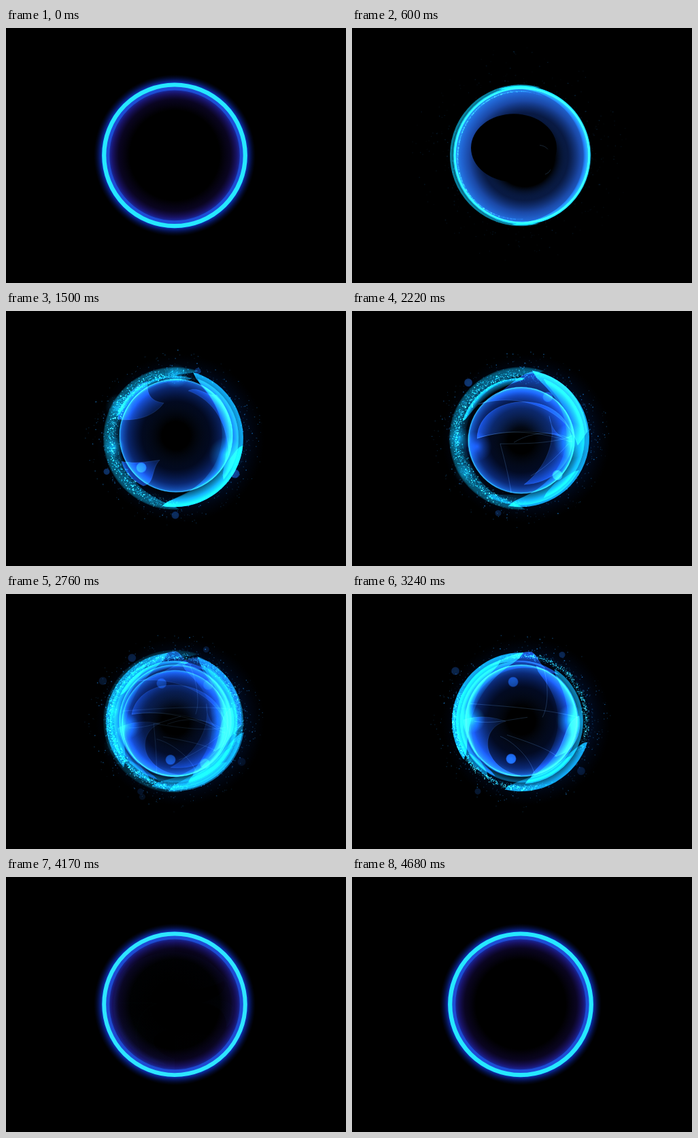
Recreate the animation shown at these times as an HTML page with a canvas. Size 500 px wide and 375 px high, loop 4.71 s.

```html
<!DOCTYPE html>
<html lang="en">
<head>
<meta charset="utf-8">
<title>Neon orb</title>
<style>
  html, body { margin: 0; width: 100%; height: 100%; overflow: hidden; background: #000; }
  canvas { display: block; width: 500px; height: 375px; }
</style>
</head>
<body>
<canvas id="stage" width="500" height="375"></canvas>
<script>
const LOOP = 4710, TAU = Math.PI * 2;
const ctx = document.getElementById('stage').getContext('2d');
const BLUE = '30,95,235', CYAN = '20,185,250', TEAL = '12,150,185', PALE = '110,180,255';

const clamp = v => Math.min(1, Math.max(0, v));
const smooth = (a, b, t) => { const u = clamp((t - a) / (b - a)); return u * u * (3 - 2 * u); };
const span = (t, a, b, c, d) => smooth(a, b, t) * (1 - smooth(c, d, t));

let seed = 71;
const rand = () => (seed = seed * 16807 % 2147483647) / 2147483647;
const make = (n, f) => Array.from({ length: n }, f);

const dust = make(2300, () => ({
  a: rand() * TAU, q: (rand() + rand() + rand()) / 1.5 - 1, glow: rand() ** 2,
  size: 0.7 + rand() * 0.9, speed: 0.12 + rand() * 0.2, phase: rand() * TAU
}));
const strays = make(380, () => ({
  a: rand() * TAU, far: rand() ** 2.2, glow: 0.2 + rand() * 0.8,
  size: 0.7 + rand() * 0.9, speed: (rand() - 0.35) * 0.3, phase: rand() * TAU
}));

// Radial gradient from [radius, rgb, alpha] stops
function radial(x, y, r, stops) {
  const g = ctx.createRadialGradient(x, y, 0, x, y, r);
  for (const [at, rgb, a] of stops) g.addColorStop(clamp(at / r), `rgba(${rgb},${a})`);
  return g;
}

function circle(x, y, r) {
  ctx.beginPath();
  ctx.arc(x, y, r, 0, TAU);
}

function mist(x, y, r, rgb, a) {
  ctx.fillStyle = radial(x, y, r, [[0, rgb, a], [r * 0.45, rgb, a * 0.45], [r, rgb, 0]]);
  circle(x, y, r);
  ctx.fill();
}

function bokeh(x, y, r, a) {
  ctx.fillStyle = radial(x, y, r, [[0, '35,125,240', a], [r * 0.8, '30,110,235', a], [r, BLUE, 0]]);
  circle(x, y, r);
  ctx.fill();
}

function sphere(x, y, r, a) {
  ctx.fillStyle = radial(x, y, r, [
    [r * 0.25, BLUE, 0], [r * 0.6, '10,45,150', 0.25 * a], [r * 0.85, '20,75,215', 0.6 * a],
    [r * 0.96, '30,110,245', 0.85 * a], [r, '40,165,255', a]
  ]);
  circle(x, y, r);
  ctx.fill();
  ctx.strokeStyle = `rgba(50,180,255,${0.45 * a})`;
  ctx.lineWidth = 1.4;
  ctx.stroke();
}

// Tapered arc; rim sets how bright its outer edge is
function band(r, from, to, w, rgb, a, rim = 1) {
  ctx.beginPath();
  ctx.arc(0, 0, r, from, to);
  for (let i = 40; i >= 0; i--) {
    const u = i / 40, ang = from + (to - from) * u;
    const inner = r - w * Math.sin(Math.PI * u) ** 0.55;
    ctx.lineTo(inner * Math.cos(ang), inner * Math.sin(ang));
  }
  ctx.closePath();
  ctx.fillStyle = radial(0, 0, r, [
    [r - w, rgb, a * 0.1], [r - w * 0.4, rgb, a * 0.65], [r - 2.5, rgb, a * (1 + rim) / 2], [r, rgb, a * rim]
  ]);
  ctx.fill();
}

function sheet(d, near, far, a, rgb = BLUE) {
  const p = new Path2D(d);
  ctx.fillStyle = radial(0, 0, far, [[near, rgb, a * 0.05], [(near + far) / 2, rgb, a * 0.45], [far, rgb, a]]);
  ctx.fill(p);
  ctx.strokeStyle = `rgba(${PALE},${a * 0.2})`;
  ctx.lineWidth = 0.8;
  ctx.stroke(p);
}

function threads(d) {
  ctx.strokeStyle = `rgba(${PALE},0.25)`;
  ctx.lineWidth = 0.8;
  ctx.stroke(new Path2D(d));
}

function bowl() {
  band(104, 1.3, 5, 10, TEAL, 0.85);
  ctx.fillStyle = radial(6, 2, 104, [
    [44, BLUE, 0], [64, '14,42,110', 0.6], [82, '28,76,175', 0.95],
    [94, '34,104,215', 1], [104, '35,150,240', 1]
  ]);
  ctx.beginPath();
  ctx.arc(2, 0, 99.5, 0, TAU);
  ctx.moveTo(53, -11);
  ctx.ellipse(-10, -11, 63, 50, 0, 0, TAU);
  ctx.fill('evenodd');
  for (const w of [1.5, 4]) {
    ctx.lineWidth = w;
    ctx.strokeStyle = 'rgba(25,190,240,0.5)';
    circle(2, 0, 99.5);
    ctx.stroke();
  }
  band(102.5, -1.9, 1.7, 10, CYAN, 0.7);
  threads('M28-15Q36-14 40-9M36 28Q42 26 44 21');
}

function petals() {
  sphere(2, -4, 83, 0.85);
  band(101, -1.3, 1.75, 32, CYAN, 0.85);
  band(94, -1.2, 0.7, 20, BLUE, 0.7);
  band(101, 0.1, 1.75, 22, CYAN, 0.5);
  sheet('M-84-28C-50-24-28-36-16-52C-32-54-42-62-40-84C-62-76-78-56-84-28Z', 30, 95, 0.7);
  sheet('M-78 34C-55 38-40 34-22 32C-35 45-28 66-46 70C-62 62-74 50-78 34Z', 20, 92, 0.75);
  sheet('M20-70C35-78 50-60 62-64C80-45 86-10 80 25C78-20 60-55 20-70Z', 40, 95, 0.55);
  band(92, 3.5, 5, 10, CYAN, 0.5);
  mist(76, 24, 26, CYAN, 0.5);
  mist(2, -92, 18, CYAN, 0.45);
  mist(-82, -46, 20, CYAN, 0.45);
  mist(-90, 12, 16, CYAN, 0.5);
  bokeh(-49, 43, 8, 0.7);
  bokeh(1, 113, 6, 0.35);
  bokeh(89, 52, 7, 0.5);
  bokeh(-100, 49, 5, 0.4);
  bokeh(34, -99, 5, 0.35);
}

function lens() {
  sphere(1, 3, 78, 0.9);
  sheet('M-64 0C-62-70 70-75 76 5C40-15-20-14-64 0Z', 10, 78, 0.7);
  sheet('M-62-50C-30-60-5-95 18-98C60-92 92-60 98-10L84 10C70-40 0-70-62-50Z', 35, 104, 0.85);
  band(101, -1.4, 1.75, 34, CYAN, 0.85);
  band(94, -1.2, 1.2, 20, CYAN, 0.4);
  band(89, -2.85, -1.5, 11, CYAN, 0.9);
  band(98, 0.5, 2.1, 18, CYAN, 0.4);
  sheet('M42-33C45-10 60 0 76 5C74 40 45 66 5 68C35 45 55 5 42-33Z', 20, 80, 0.6);
  threads('M-64 0C-20-15 30-10 74 5M-30 8C0 8 50 8 76-4M-10 6C20-12 50-10 72 0M-30 8C-20 45-16 65-14 80M15 55C35 45 55 25 70 8');
  mist(74, 4, 26, CYAN, 0.6);
  mist(-90, 0, 18, CYAN, 0.5);
  mist(-82, 50, 16, CYAN, 0.3);
  mist(-64, 12, 22, BLUE, 0.6);
  bokeh(-77, -82, 6.5, 0.45);
  bokeh(40, -61, 8, 0.4);
  bokeh(54, 54, 8, 0.75);
  bokeh(-33, 110, 5, 0.25);
}

function swirl() {
  sphere(1, -1, 82, 0.9);
  band(101, 2.55, 4.75, 32, CYAN, 0.9);
  band(95, 2.1, 4.4, 22, CYAN, 0.6);
  band(89, 2, 5.4, 14, BLUE, 0.75);
  band(92, -1, 1.5, 24, CYAN, 0.65);
  band(85, -1.3, 1.4, 30, BLUE, 0.7);
  band(103, 0.3, 1.8, 24, CYAN, 0.85);
  band(90, 0.6, 2.6, 12, CYAN, 0.4);
  sheet('M-45-82C-20-95 0-103 16-102C26-96 25-88 36-78C10-92-20-90-45-82Z', 55, 104, 0.85);
  sheet('M-84-2C-60-10-40-6-22 0C-45 5-55 30-44 50C-36 66-20 76 0 80C-40 85-80 50-84-2Z', 20, 88, 0.7);
  sheet('M86-8C66 0 66 30 50 52C80 44 90 20 86-8Z', 30, 88, 0.8);
  threads('M-74-26C-20-22 40-18 84-6M-68 0C-40 4-20-2 10-6M34-78C42-50 40-20 32-6M-30 22C-10 30 15 55 20 76M-20 20C10 30 40 40 54 52');
  mist(-72, -3, 20, CYAN, 0.7);
  mist(74, -2, 22, CYAN, 0.6);
  bokeh(-11, -58, 8, 0.5);
  bokeh(-14, 55, 8, 0.8);
  bokeh(-96, -74, 6.5, 0.3);
  bokeh(89, 73, 6.5, 0.2);
  bokeh(61, -98, 5, 0.3);
  bokeh(-63, 103, 5, 0.2);
}

function shell() {
  sheet('M0-77C-60-77-92-40-90 10C-88 65-45 98 0 100L0 80C-30 72-40 50-22 42C-14 38-6 36 0 36Z', 35, 104, 0.9, '32,115,245');
  sheet('M0-77C50-75 86-40 87 0C87 20 82 30 76 34C78 10 60-2 38-2C60-8 80-20 72-35C55-22 20-20 0-24Z', 32, 100, 0.85);
  sheet('M-48-72C-20-76-10-93 0-98L0-77C-20-78-35-74-48-72Z', 30, 125, 0.6);
  sheet('M0 42C30 40 55 45 66 52C50 72 25 80 0 75Z', 20, 125, 0.25);
  sheet('M38-2C62-12 84-4 86 4C86 18 82 28 76 34C78 14 62 0 38-2Z', 30, 100, 0.6);
  threads('M-82-3C-60 0-45-4-27-1M-27-1C-60 10-62 50-48 75M40-72C56-55 74-40 82-28');
  band(90, 1.7, 3.9, 9, CYAN, 0.6);
  mist(-72, 48, 36, CYAN, 0.5);
  mist(-32, 84, 24, CYAN, 0.4);
  mist(87, -38, 18, CYAN, 0.5);
  mist(72, 54, 22, TEAL, 0.5);
  mist(-45, -84, 16, CYAN, 0.45);
}

// Each scene: drawing, fade window, pose time, turn rate in rad/s
const scenes = [
  [bowl, [120, 480, 750, 1400], 600, 0.25],
  [petals, [800, 1350, 1600, 2150], 1500, 0.3],
  [lens, [1600, 2120, 2450, 3150], 2220, 0.3],
  [swirl, [2350, 3050, 3280, 3600], 3240, 0.3],
  [shell, [3300, 3650, 3760, 4220], 3750, 0]
];

function drawDust(t) {
  const early = span(t, 150, 550, 700, 1100) * 0.2;
  const left = span(t, 800, 1350, 2450, 3100);
  const pair = span(t, 2450, 3100, 3280, 3600);
  const all = span(t, 3350, 3680, 3760, 4200);
  if (early + left + pair + all === 0) return;
  const thick = 12 * left + 6 * pair + 7 * all + 4 * early;
  const mid = 94 + 3 * pair + 2 * all;
  for (const p of dust) {
    const a = p.a + p.speed * t / 1000;
    const c = Math.cos(a - 3.3);
    const mask = (early + left) * clamp(0.4 + 1.6 * c)
      + pair * clamp(2.2 * Math.abs(Math.cos(a + 0.7)) - 0.7) + all * 0.75;
    if (mask < 0.02) continue;
    const r = mid + p.q * thick + Math.sin(a * 3 + t / 700);
    const flicker = 0.7 + 0.3 * Math.sin(t / 160 + p.phase);
    ctx.globalAlpha = clamp(mask * flicker * (0.3 + 0.8 * p.glow));
    ctx.fillStyle = p.glow > 0.6 ? '#4cecff' : '#14b4d2';
    ctx.fillRect(r * Math.cos(a), r * Math.sin(a), p.size, p.size);
  }
  ctx.globalAlpha = 1;
}

function drawStrays(t) {
  const show = span(t, 20, 300, 3250, 3650);
  if (!show) return;
  const bright = 0.3 + 0.55 * smooth(800, 1500, t);
  const reach = 28 + 28 * span(t, 0, 350, 800, 1500);
  ctx.fillStyle = '#1a7cd0';
  for (const p of strays) {
    const a = p.a + p.speed * t / 1000;
    const r = 102 + p.far * reach + 3 * Math.sin(t / 600 + p.phase);
    ctx.globalAlpha = show * bright * p.glow * (0.7 + 0.3 * Math.sin(t / 200 + p.phase));
    ctx.fillRect(r * Math.cos(a), r * Math.sin(a), p.size, p.size);
  }
  ctx.globalAlpha = 1;
}

function drawMantle(t) {
  const a = span(t, 900, 1400, 3200, 3600);
  if (!a) return;
  ctx.fillStyle = radial(8, 0, 124, [[75, '0,40,120', 0], [96, '0,50,150', 0.2 * a], [124, '0,20,80', 0]]);
  circle(8, 0, 124);
  ctx.fill();
  const tube = span(t, 900, 1400, 2450, 3100);
  band(105, 1.5, 5.05, 24, TEAL, 0.85 * tube, 0.25);
}

function drawNeon(t) {
  const out = 1 - smooth(40, 480, t);
  const alpha = out + smooth(3380, 3720, t);
  const k = out + smooth(3750, 4250, t);
  if (alpha < 0.005) return;
  ctx.globalAlpha = clamp(alpha);
  ctx.fillStyle = radial(0, 0, 120, [
    [66, '30,15,100', 0], [82, '28,14,95', 0.34 * k], [92, '32,26,135', 0.8 * k],
    [97, '24,50,180', 0.25 + 0.7 * k], [103, '22,70,225', 0.9], [107, '14,52,190', 0.9],
    [112, '8,30,125', 0.6], [119, '4,12,60', 0]
  ]);
  circle(0, 0, 120);
  ctx.fill();
  ctx.globalCompositeOperation = 'source-over';
  ctx.lineWidth = 5.5;
  ctx.strokeStyle = `rgba(31,80,218,${0.9 * k})`;
  circle(0, 0, 98.6);
  ctx.stroke();
  ctx.lineWidth = 1.6 + 4.6 * k;
  ctx.strokeStyle = `rgb(${150 - 112 * k},${205 + 27 * k},255)`;
  circle(0, 0, 103.8);
  ctx.stroke();
  ctx.globalAlpha = 1;
}

function draw(t) {
  ctx.setTransform(1, 0, 0, 1, 0, 0);
  ctx.globalCompositeOperation = 'source-over';
  ctx.fillStyle = '#000';
  ctx.fillRect(0, 0, 500, 375);
  ctx.translate(248, 187.3);
  ctx.globalCompositeOperation = 'lighter';
  drawMantle(t);
  for (const [paint, fade, pose, turn] of scenes) {
    const a = span(t, ...fade);
    if (!a) continue;
    ctx.save();
    ctx.globalAlpha = a;
    ctx.rotate(turn * (t - pose) / 1000);
    paint();
    ctx.restore();
  }
  drawDust(t);
  drawStrays(t);
  drawNeon(t);
}

function tick() {
  draw(performance.now() % LOOP);
  requestAnimationFrame(tick);
}
tick();
</script>
</body>
</html>
```
